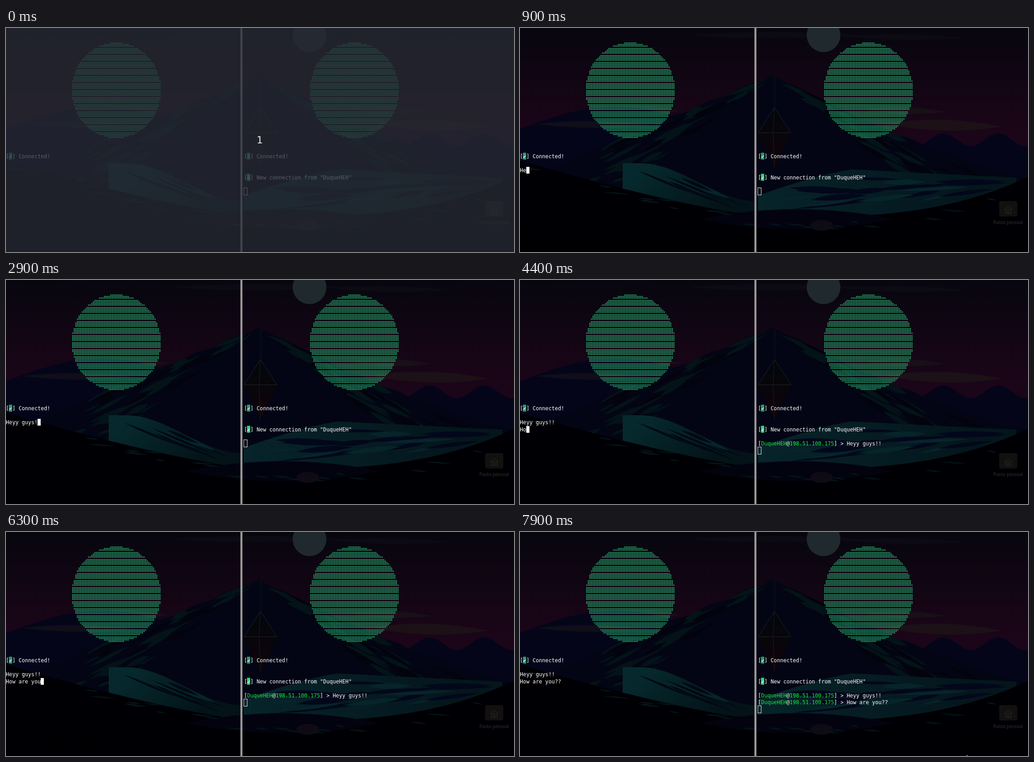
Recreate the animation shown at these times as an HTML page with a canvas. Size 1128x497 px, loop 8000 ms.

```html
<!DOCTYPE html>
<html lang="en">
<head>
<meta charset="utf-8">
<title>Terminal chat</title>
<style>
  html, body { margin: 0; width: 100%; height: 100%; overflow: hidden; background: #000; }
  canvas { display: block; }
</style>
</head>
<body>
<canvas id="stage" width="1128" height="497"></canvas>
<script>
const W = 1128, H = 497, LOOP = 8000;
const SCALE = 0.782, CELL = 9 * SCALE, ROW = 15.6, TOP = 307.9, LEFT = -0.2, RIGHT = 528.4;
const WHITE = '#fff', GREEN = '#26a269', BRIGHT = '#33da7a', LIME = '#12ee35';
const USER = 'DuqueHEH', HOST = '198.51.100.175';

// Key presses and the return key, in tenths of a second.
const LINES = [
  { body: 'Heyy guys!!', keys: [5, 9, 12, 13, 16, 19, 21, 22, 23, 29, 31], sent: 34 },
  { body: 'How are you??', keys: [41, 44, 45, 46, 48, 50, 51, 53, 58, 60, 63, 69, 70], sent: 72 }
];
const BLINKS = [[0, 3], [39, 40], [78, 80]];

const ctx = document.getElementById('stage').getContext('2d');

function layer(paint) {
  const c = document.createElement('canvas');
  c.width = W;
  c.height = H;
  paint(c.getContext('2d'));
  return c;
}

function random(seed) {
  return () => (seed = (seed * 16807) % 2147483647) / 2147483647;
}

function fade(g, from, to, x0, y0, x1, y1) {
  const grad = g.createLinearGradient(x0, y0, x1, y1);
  grad.addColorStop(0, from);
  grad.addColorStop(1, to);
  return grad;
}

// Fills everything below the curve y = f(x).
function land(g, color, f, from = 0, to = W) {
  g.fillStyle = color;
  g.beginPath();
  g.moveTo(from, H);
  for (let x = from; x <= to; x += 2) g.lineTo(x, f(x));
  g.lineTo(to, H);
  g.fill();
}

// A pointed streak from one end to the other.
function streak(g, color, x, y, dx, dy, thick) {
  const mx = x + dx / 2, my = y + dy / 2;
  g.fillStyle = color;
  g.beginPath();
  g.moveTo(x, y);
  g.quadraticCurveTo(mx, my - thick, x + dx, y + dy);
  g.quadraticCurveTo(mx, my + thick, x, y);
  g.fill();
}

function disk(g, color, x, y, rx, ry = rx) {
  g.fillStyle = color;
  g.beginPath();
  g.ellipse(x, y, rx, ry, 0, 0, 7);
  g.fill();
}

function line(g, color, ...p) {
  g.strokeStyle = color;
  g.lineWidth = 1;
  g.beginPath();
  for (let i = 0; i < p.length; i += 2) g.lineTo(p[i], p[i + 1]);
  g.stroke();
}

function sky(g) {
  g.fillStyle = fade(g, '#07060f', '#1b0518', 0, 0, 0, 230);
  g.fillRect(0, 0, W, H);
  streak(g, '#0c0a13', 370, 16, 380, 0, 14);
  streak(g, '#0c0a13', 715, 18, 270, 4, 12);
  disk(g, '#20292d', 674, 16, 37.5);
  streak(g, '#171017', 760, 180, 185, 6, 16);
  streak(g, '#1b1117', 810, 212, 260, 7, 24);
  streak(g, '#151018', 160, 180, 200, 4, 18);
}

const farLeft = x => 224 - 50 * Math.sin(x / 135);
const farRight = x => 248 - 14 * Math.cos((x - 940) / 19.4);
const slope = x => {
  const d = Math.abs(x - 562);
  return 104 + (x < 562 ? d * 0.42 : d * 0.54 - d * d * 0.00023) + 2 * Math.sin(d / 13);
};
const hillLeft = x => 342 - 42 * Math.cos(Math.max(0, x - 265) / 83);
const hillRight = x => x < 740 ? 314 + 58 * ((740 - x) / 212) ** 1.3 : 314 + (x - 740) / 20;
const shore = x => x < 560
  ? 420 - 126 * ((560 - x) / 560) ** 1.3
  : 420 - 90 * ((x - 560) / 568) ** 3;

function mountain(g) {
  land(g, '#05051a', farLeft, 0, 400);
  land(g, '#05051a', farRight, 780);
  streak(g, '#0f0e19', 36, 213, 250, 2, 15);
  land(g, '#030514', slope, 60);
  const rnd = random(77);
  for (let i = 0; i < 90; i++) {
    const side = i % 2 ? 1 : -1, d = 10 + rnd() * 400;
    const x = 562 + side * d, y = slope(x) + 3 + rnd() * d * 0.33;
    const run = 30 + rnd() * 75;
    streak(g, i % 5 < 3 ? '#031318' : '#02030c', x, y, side * run, run * (0.4 + rnd() * 0.2), 4 + rnd() * 11);
  }
}

function hills(g) {
  land(g, fade(g, '#06242a', '#04161c', 528, 0, 1000, 0), hillRight, 528, 1102);
  const rnd = random(31);
  for (let i = 0; i < 24; i++) {
    const x = 580 + rnd() * 380, run = 60 + rnd() * 120, drop = rnd();
    const y = hillRight(x) + 6 + drop * (shore(x) - hillRight(x) - 18);
    streak(g, i % 4 ? '#03071a' : '#06242a', x, y, run, 5 - drop * 26, 5 + rnd() * 8);
  }
  land(g, fade(g, '#06292d', '#031318', 290, 300, 400, 430), hillLeft, 228, 525);
  for (let i = 0; i < 9; i++) {
    const x = 232 + rnd() * 150, run = 70 + rnd() * 80;
    streak(g, i % 3 ? '#020913' : '#05252a', x, hillLeft(x) + 8 + rnd() * 22, run, run * 0.42, 5 + rnd() * 7);
  }
}

function foreground(g) {
  land(g, '#000004', shore);
  streak(g, '#03030f', 400, 424, 430, 0, 44);
  disk(g, '#0e0b15', 670, 438, 25, 12);
  const rnd = random(5);
  for (let i = 0; i < 22; i++) {
    const x = rnd() * W;
    streak(g, '#03151a', x, shore(x) + 4 + rnd() * 20, 20 + rnd() * 40, 4, 3);
  }
  for (let x = 0; x < W; x += 4) {
    const y = 432 + 22 * Math.sin(x / 360) + rnd() * 22;
    line(g, '#000003', x, 480, x + rnd() * 12 - 6, y);
  }
  g.fillStyle = '#000003';
  g.fillRect(0, 472, W, H);
}

function crystal(g) {
  const [x, y] = [565, 233];
  line(g, '#0a181c', x + 0.5, 106, x + 0.5, 176);
  g.fillStyle = fade(g, '#04060b', '#0f040b', 0, 200, 0, 300);
  g.beginPath();
  g.moveTo(x, y - 57);
  g.lineTo(x + 37, y);
  g.lineTo(x, y + 77);
  g.lineTo(x - 37, y);
  g.fill();
  line(g, '#1a2729', x - 37, y, x, y - 57, x + 37, y);
  line(g, '#222426', x - 37, y - 0.5, x + 37, y - 0.5);
  line(g, '#1a1e20', x, y - 57, x - 3, y, x, y + 77);
}

function folder(g) {
  g.fillStyle = '#12110f';
  g.beginPath();
  g.roundRect(1064, 384, 40, 34, 4);
  g.fill();
  line(g, '#2a2927', 1075, 403, 1084, 395, 1093, 403);
  g.strokeRect(1077.5, 402.5, 13, 9);
  g.strokeRect(1082.5, 405.5, 3, 6);
  g.font = '10.3px "Noto Sans", sans-serif';
  g.textAlign = 'center';
  g.fillStyle = '#303032';
  g.fillText('Pasta pessoal', 1084, 435);
  g.textAlign = 'left';
}

// Plain disc built from terminal dots.
function dotDisc(g, left) {
  g.fillStyle = GREEN;
  for (let row = -18; row < -3; row++) {
    for (let k = 0; k < 4; k++) {
      const y = TOP + row * ROW + 1.8 + k * 3.3;
      for (let col = 42; col < 98; col++) {
        const x = col * CELL / 2 - 0.6;
        if (Math.hypot((x - 244) / 99, (y - 137) / 106) < 1) g.fillRect(left + x, y, 2.4, 2.4);
      }
    }
  }
}

function text(g, str, left, col, row, color) {
  g.save();
  g.translate(left + col * CELL, TOP + row * ROW + 12);
  g.scale(SCALE, SCALE);
  g.font = '15px "DejaVu Sans Mono", monospace';
  g.fillStyle = color;
  [...str].forEach((ch, i) => g.fillText(ch, i * 9, 0));
  g.restore();
}

function status(g, left, row, tint, message) {
  text(g, '[', left, 0, row, WHITE);
  g.fillStyle = tint;
  g.fillRect(left + 6.8, TOP + row * ROW, 7, 15.2);
  text(g, '✔', left, 1, row, '#e4efe8');
  text(g, '] ' + message, left, 2, row, WHITE);
}

const backdrop = layer(g => {
  [sky, mountain, hills, foreground, crystal, folder].forEach(paint => paint(g));
  for (const left of [LEFT, RIGHT]) {
    dotDisc(g, left);
    status(g, left, -2, GREEN, 'Connected!');
  }
  status(g, RIGHT, 1, BRIGHT, `New connection from "${USER}"`);
  g.fillStyle = '#9b9795';
  g.fillRect(520.5, 0, 4.5, H);
});

function received(row, body) {
  const parts = [['[', WHITE], [USER, LIME], ['@', WHITE], [HOST, LIME], ['] > ' + body, WHITE]];
  let col = 0;
  for (const [str, color] of parts) {
    text(ctx, str, RIGHT, col, row, color);
    col += str.length;
  }
}

function countdown() {
  ctx.fillStyle = 'rgba(40, 44, 53, 0.77)';
  ctx.fillRect(0, 0, W, H);
  ctx.font = '22px "DejaVu Sans", sans-serif';
  ctx.textAlign = 'center';
  ctx.fillStyle = '#e6e6e6';
  ctx.fillText('1', 563.5, 256);
  ctx.textAlign = 'left';
}

function draw(ms) {
  const t = ms / 100;
  ctx.drawImage(backdrop, 0, 0);

  let row = 0, col = 0;
  LINES.forEach(({ body, keys, sent }, i) => {
    const typed = keys.filter(at => t >= at).length;
    text(ctx, body.slice(0, typed), LEFT, 0, i, WHITE);
    if (i === row) col = typed;
    if (t >= sent) {
      received(3 + i, body);
      row = i + 1;
      col = 0;
    }
  });

  if (!BLINKS.some(([from, to]) => t >= from && t < to)) {
    ctx.fillStyle = WHITE;
    ctx.fillRect(Math.round(LEFT + col * CELL), Math.round(TOP + row * ROW), 7, 15);
  }
  ctx.strokeStyle = '#f0f0f0';
  ctx.lineWidth = 1;
  ctx.strokeRect(528, Math.round(TOP + (3 + row) * ROW - 0.5) + 0.5, 7.5, 16);

  if (t < 1) countdown();
  if (t >= 79) {
    ctx.fillStyle = '#ddd';
    ctx.fillRect(992, 495, 1.5, 2);
  }
}

const start = performance.now();
function tick() {
  draw((performance.now() - start) % LOOP);
  requestAnimationFrame(tick);
}
tick();
</script>
</body>
</html>
```
